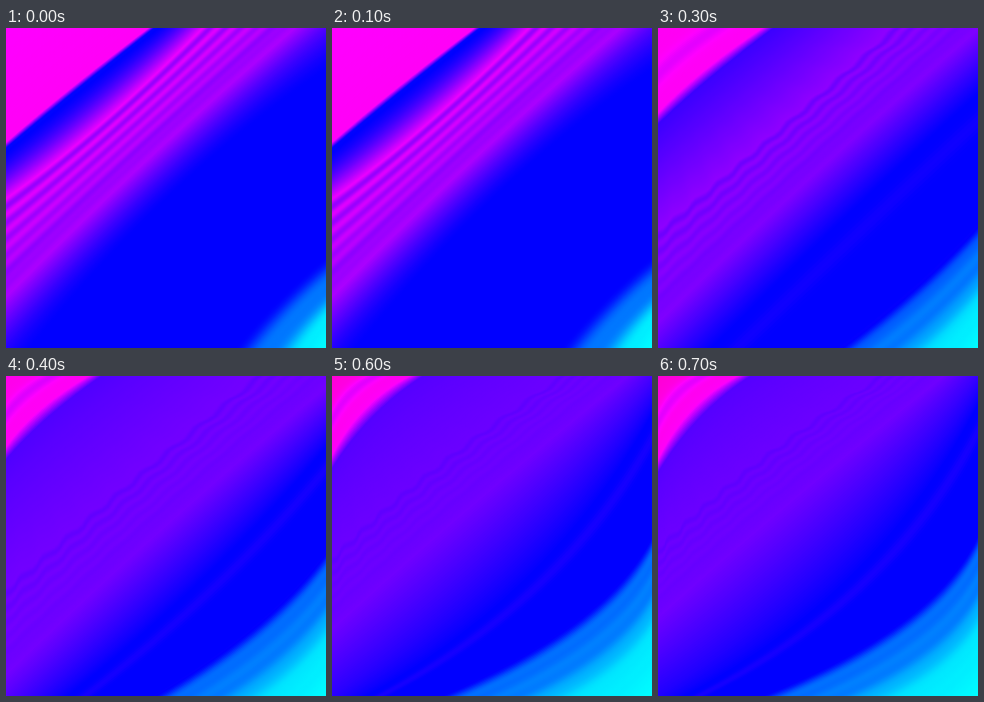
An HTML page with a canvas that plays this animation: 320x320 px, repeating every 0.8 s.

```html
<!DOCTYPE html>
<html>
<head>
<meta charset="utf-8">
<style>
html, body { margin: 0; height: 100%; overflow: hidden; background: #00f; }
canvas { display: block; width: 100vw; height: 100vh; }
</style>
</head>
<body>
<canvas id="c" width="320" height="320"></canvas>
<script>
const ctx = document.getElementById('c').getContext('2d');
const SIZE = 320, STEP = 100, LOOP = 800;

const clamp = v => Math.min(1, Math.max(0, v));
const lerp = (a, b, u) => a + (b - a) * u;
const mix = (a, b, u) => a.map((v, i) => lerp(v, b[i], u));
const smooth = u => u * u * (3 - 2 * u);
const bump = (u, mid, width) => Math.exp(-(((u - mid) / width) ** 2));

// A contour is [place on left+bottom edge, on the diagonal, on top+right edge].
// It drifts from a to b and swells along the diagonal on the way.
function drift(a, b, swell, k) {
  const s = swell * Math.sin(Math.PI * k);
  const [p, m, q] = mix(a, b, k);
  return [p + 2 * s, m + s, q + 2 * s];
}

// Fill everything to the lower right of a contour
function fillBelow([p, m, q], hue, wave) {
  const sx = Math.max(0, p - SIZE), sy = Math.min(p, SIZE);
  const ex = Math.min(q, SIZE), ey = Math.max(0, q - SIZE);
  const cx = 2 * m - (sx + ex) / 2, cy = 2 * m - (sy + ey) / 2;
  ctx.beginPath();
  for (let s = -.1; s < 1.11; s += .02) {
    const a = (1 - s) ** 2, b = 2 * s * (1 - s), c = s * s;
    const w = wave * Math.sin(s * 62);
    ctx.lineTo(a * sx + b * cx + c * ex + w, a * sy + b * cy + c * ey + w);
  }
  ctx.lineTo(999, -99);
  ctx.lineTo(999, 999);
  ctx.lineTo(-99, 999);
  ctx.fillStyle = `hsl(${hue.toFixed(2)} 100% 50%)`;
  ctx.fill();
}

function band(from, to, steps, hueAt, waveAt = () => 0) {
  for (let i = 0; i < steps; i++) {
    const u = i / steps;
    fillBelow(mix(from, to, u), hueAt(u), waveAt(u));
  }
}

function draw(t) {
  const k = smooth(clamp((t - 90) / 610));
  const fade = 1 - (1 - k) ** 4;

  const rim = drift([114, 62, 142], [82, 33, 78], -14, k);
  const width = lerp(6, 14, fade);
  const past = [rim[0] + width, rim[1] + width * .6, rim[2] + width];
  const stripe = drift([170, 95, 196], [170, 90, 220], 20, k);
  const stripeEnd = drift([268, 136, 288], [240, 128, 285], 22, k);
  const blue = drift([345, 166, 362], [345, 196, 348], 18, k);
  const blueEnd = drift([545, 270, 545], [418, 243, 475], -8, k);
  const cyan = drift([622, 309, 614], [600, 301, 600], 0, k);

  const pink = lerp(300, 310, k), edge = lerp(239, 260, fade);
  const first = lerp(295, 265, fade), last = lerp(280, 266, fade);
  const amp = lerp(10, 1.5, fade), wave = 1.5 * fade;

  ctx.fillStyle = `hsl(${pink} 100% 50%)`;
  ctx.fillRect(0, 0, SIZE, SIZE);
  band([0, 0, 0], rim, 36, u => lerp(pink, 302, u) - 12 * fade * bump(u, .55, .13));
  band(rim, past, 10, u => lerp(302, edge, u));
  band(past, stripe, 44,
    u => lerp(edge, first, u ** lerp(1.6, .8, fade)), u => wave * u * u);
  band(stripe, stripeEnd, 100,
    u => lerp(first, last, u) + amp * (Math.cos(12 * Math.PI * u) - 1) * (1 - u) - amp * .6 * bump(u, .8, .12),
    u => wave * (1 - u));
  band(stripeEnd, blue, 44, u => lerp(240, last, (1 - u) ** lerp(1.4, .9, fade)));
  band(blue, blueEnd, 30, u => 240 + 5 * fade * bump(u, .2, .08));
  band(blueEnd, cyan, 60, u => {
    const v = u ** lerp(1, .6, fade);
    const terrace = v - Math.sin(4 * Math.PI * v) / (4 * Math.PI);
    return lerp(240, 184, terrace) + 3 * fade * Math.sin(30 * u) * (1 - u);
  });
  band(cyan, [640, 320, 640], 12, u => lerp(184, 180, u));
}

let shown = -1;
function tick() {
  const t = Math.floor(performance.now() % LOOP / STEP) * STEP;
  if (t !== shown) draw(shown = t);
  requestAnimationFrame(tick);
}
tick();
</script>
</body>
</html>
```
